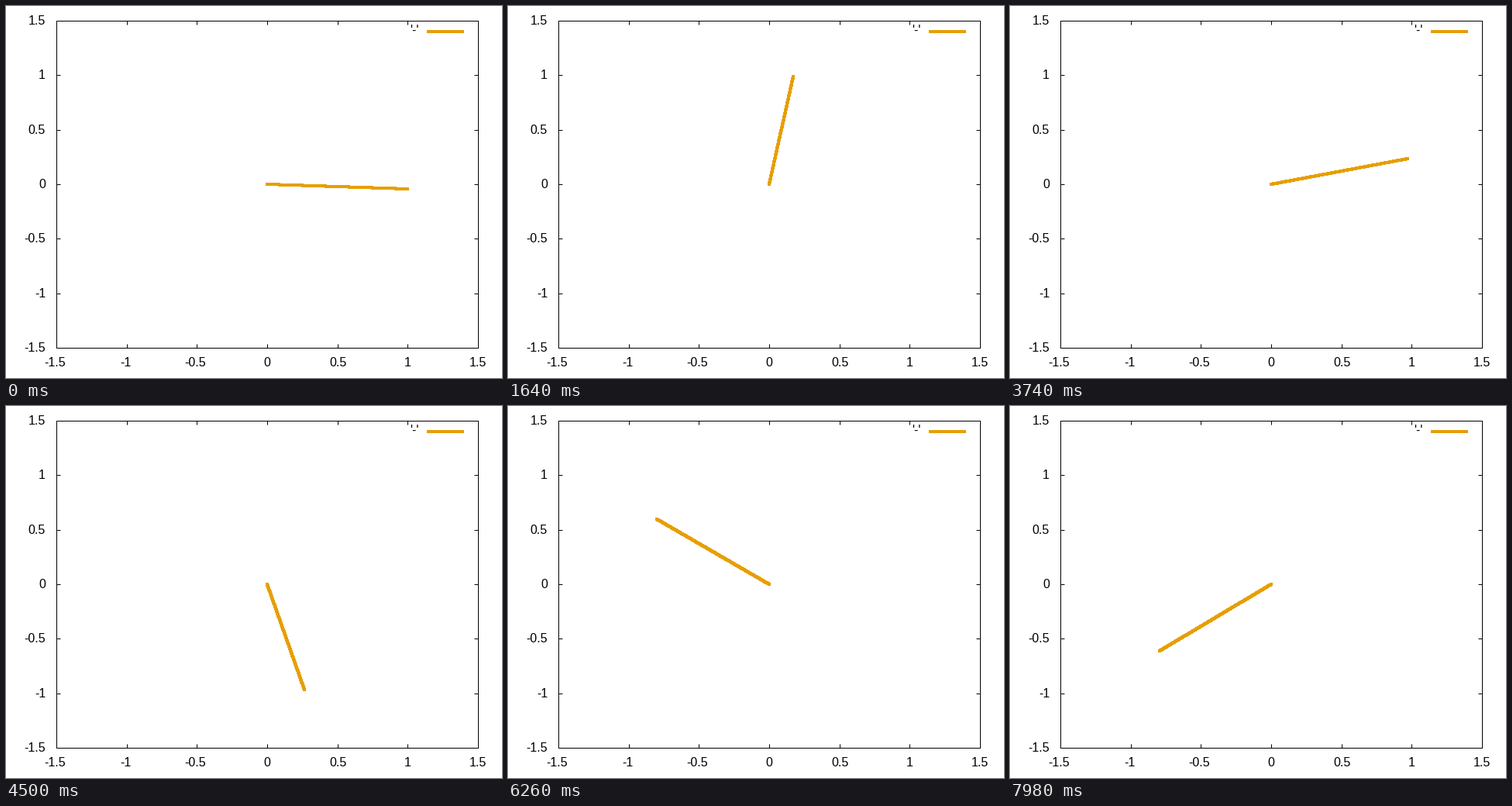
Recreate the animation shown at these times as a matplotlib script. Size 640 by 480 pixels, loop 8 s.

```python
import numpy as np
import matplotlib.pyplot as plt
from matplotlib.animation import FuncAnimation
from matplotlib.collections import LineCollection, PolyCollection

W, H, DPI = 640, 480, 100
FRAMES, INTERVAL = 400, 20
LEFT, RIGHT, TOP, BOTTOM = 65, 609, 19, 441
ORANGE = "#e69f00"
PX = 72 / DPI  # points per pixel
BRUSH = np.array([(-2, -2), (2, -2), (2, 2), (-2, 2)])

# Swing angle in degrees from straight down, at times in seconds
KEY_TIMES = np.array([0, 0.82, 1.64, 2.09, 2.92, 3.78, 4.55,
                      5.45, 6.24, 6.53, 7.24, 7.40, 7.98])
KEY_ANGLES = np.array([87.55, 143.9, 170.2, 173.8, 158.0, 99.8, 9.2,
                       -88.1, -126.4, -129.3, -111.0, -101.6, -52.4])
START_SPEED, END_SPEED = 88, 102


def spline_slopes(t, y, first, last):
    """Slopes of the smooth cubic spline with fixed end slopes."""
    n, h = len(t), np.diff(t)
    d = np.diff(y) / h
    a, b = np.eye(n), np.zeros(n)
    b[0], b[-1] = first, last
    for i in range(1, n - 1):
        a[i, i - 1:i + 2] = h[i], 2 * (h[i - 1] + h[i]), h[i - 1]
        b[i] = 3 * (h[i] * d[i - 1] + h[i - 1] * d[i])
    return np.linalg.solve(a, b)


SLOPES = spline_slopes(KEY_TIMES, KEY_ANGLES, START_SPEED, END_SPEED)


def swing_angle(t):
    i = min(np.searchsorted(KEY_TIMES, t, side="right") - 1, len(KEY_TIMES) - 2)
    h = KEY_TIMES[i + 1] - KEY_TIMES[i]
    s = (t - KEY_TIMES[i]) / h
    ease = s * s * (3 - 2 * s)
    angle = ((1 - ease) * KEY_ANGLES[i] + ease * KEY_ANGLES[i + 1]
             + h * s * (1 - s) * ((1 - s) * SLOPES[i] - s * SLOPES[i + 1]))
    return np.radians(angle)


def to_px(x, y):
    return np.rint([LEFT + (x + 1.5) * (RIGHT - LEFT) / 3,
                    BOTTOM - (y + 1.5) * (BOTTOM - TOP) / 3])


def brush_stroke(start, end):
    """Square brush stamped on each pixel of a stepped line."""
    steps = int(np.abs(end - start).max())
    dots = np.floor(np.linspace(start, end, steps + 1) + 0.5)
    return dots[:, None] + BRUSH


plt.rcParams["font.family"] = "Liberation Sans"
fig = plt.figure(figsize=(W / DPI, H / DPI), dpi=DPI, facecolor="white")
ax = fig.add_axes([0, 0, 1, 1])
ax.set_xlim(0, W)
ax.set_ylim(H, 0)
ax.axis("off")


def label(x, y, text, align):
    ax.text(x, y, text, fontsize=16 * PX, ha=align, va="baseline", color="black")


def draw_plot_frame(tick=5):
    corners = [(LEFT, TOP), (RIGHT, TOP), (RIGHT, BOTTOM), (LEFT, BOTTOM), (LEFT, TOP)]
    lines = [corners]
    for value in np.arange(-1.5, 1.6, 0.5):
        x, y = to_px(value, value)
        text = f"{value:g}"
        label(x - (2 if value < 0 else 0), 465, text, "center")
        label(51, y + 5, text, "right")
        lines += [[(x, TOP), (x, TOP + tick)], [(x, BOTTOM), (x, BOTTOM - tick)],
                  [(LEFT, y), (LEFT + tick, y)], [(RIGHT, y), (RIGHT - tick, y)]]
    # Snapping moves whole coordinates to pixel centres
    ax.add_collection(LineCollection(lines, colors="black", linewidths=PX,
                                     capstyle="butt", snap=True), autolim=False)


def add_stroke(start, end):
    stroke = PolyCollection(brush_stroke(np.array(start), np.array(end)),
                            facecolors=ORANGE, edgecolors="none",
                            linewidths=0, snap=True, zorder=3)
    return ax.add_collection(stroke, autolim=False)


draw_plot_frame()
label(533, 36, "'-'", "right")
add_stroke((545, 33), (589, 33))
PIVOT = to_px(0, 0)
arm = add_stroke(PIVOT, to_px(1, 0))


def update(frame):
    angle = swing_angle(frame * INTERVAL / 1000)
    arm.set_verts(brush_stroke(PIVOT, to_px(np.sin(angle), -np.cos(angle))))
    return [arm]


anim = FuncAnimation(fig, update, frames=FRAMES, interval=INTERVAL,
                     repeat=True, repeat_delay=0, blit=True)
plt.show()
```
